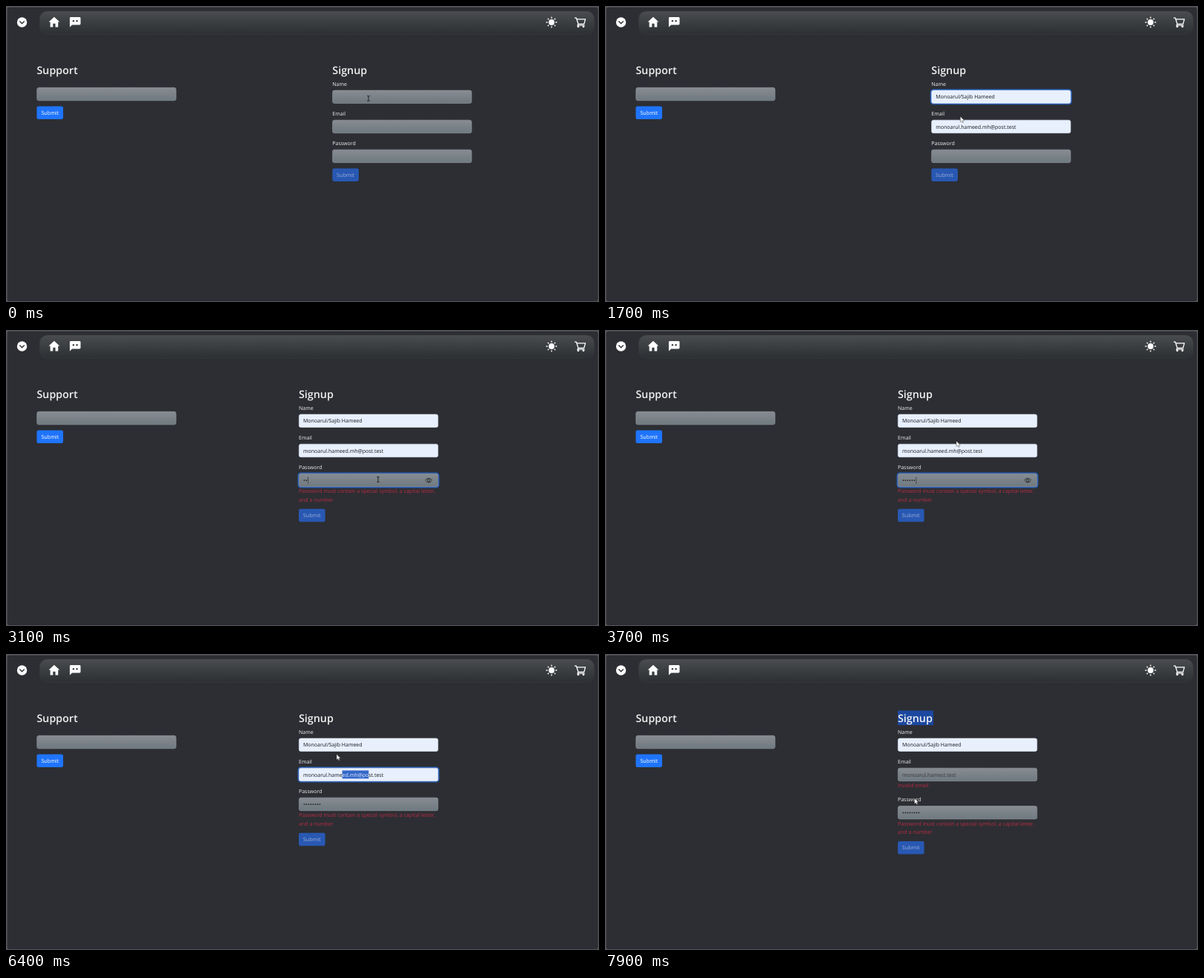
Animation of 800 by 400 pixels, one loop 8000 ms. Source, as an HTML page:

```html
<!DOCTYPE html>
<html lang="en">
<head>
<meta charset="utf-8">
<title>Signup form</title>
<style>
  html, body { margin: 0; width: 100%; height: 100%; overflow: hidden; background: #55565b; }
  svg { display: block; width: 800px; height: 400px; }
  text {
    font: 7px "Open Sans", "Noto Sans", sans-serif;
    fill: #f1f1f2;
    text-rendering: geometricPrecision;
    white-space: pre;
  }
  .head { font-size: 14.3px; font-weight: 600; }
  .error { font-size: 7.05px; fill: #b92c44; }
  .btn { font-size: 7.2px; fill: #fff; }
  .off .btn { fill: #98add8; }
  .box { fill: url(#field); stroke: #949ba1; stroke-width: .6; }
  .filled .box { fill: #e8f0fe; stroke: #dfe8f8; }
  .value { fill: #34393e; }
  .filled .value { fill: #15171a; }
  .ring { fill: none; stroke: #245cb8; stroke-width: 2; }
</style>
</head>
<body>
<svg id="stage" viewBox="0 0 800 400">
  <defs>
    <linearGradient id="field" x2="0" y2="1">
      <stop stop-color="#878c92"/><stop offset="1" stop-color="#6f7980"/>
    </linearGradient>
    <linearGradient id="bar" x2="0" y2="1">
      <stop stop-color="#4a4c4f"/><stop offset="1" stop-color="#2c3033"/>
    </linearGradient>
  </defs>
  <rect width="800" height="400" fill="#55565b"/>
  <rect x="1.7" y="1.7" width="797" height="397.3" rx="3" fill="#2d2e33"/>
  <rect x="45.5" y="7" width="748" height="31" rx="10" fill="url(#bar)" stroke="#3a3c40" stroke-width=".5"/>

  <circle cx="21.6" cy="22" r="6.7" fill="#fff"/>
  <path d="M18.4 20.6l3.2 3.2 3.2-3.2" fill="none" stroke="#2d2e33" stroke-width="1.4"/>
  <path d="M65 14.8l7.3 6.8h-2v6.8h-3.7v-4.6h-3.2v4.6h-3.7v-6.8h-2z" fill="#fff"/>
  <path d="M87.4 15h11.8q1.4 0 1.4 1.4v7.6q0 1.4-1.4 1.4h-9.9l-3.3 3.2v-12.2q0-1.4 1.4-1.4z" fill="#fff"/>
  <g fill="#3a3c40"><circle cx="91" cy="20.2" r="1.2"/><circle cx="95.7" cy="20.2" r="1.2"/></g>
  <g id="sun" fill="#fff"><circle cx="736" cy="22" r="3.9"/></g>
  <g fill="none" stroke="#fff" stroke-width="1.3" stroke-linejoin="round">
    <path d="M767 16.2h2.5l2.5 8.2h7.8l1.8-6.5h-11.3M772 24.4l-1 1.8h9.6"/>
    <circle cx="772" cy="27.7" r=".8"/><circle cx="779" cy="27.7" r=".8"/>
  </g>

  <text class="head" x="41.5" y="92">Support</text>
  <rect class="box" x="41.8" y="110.3" width="187.5" height="17.5" rx="2.5"/>
  <rect x="41.5" y="135.5" width="35.6" height="17.6" rx="2.3" fill="#1f74fb"/>
  <text class="btn" x="47.4" y="147">Submit</text>

  <g id="form">
    <rect id="headSel" x="0" y="76.5" width="48" height="19.6" fill="#1c48a0"/>
    <text class="head" x="0" y="92">Signup</text>
    <g id="name"></g>
    <g id="email"></g>
    <text id="emailError" class="error" x="0" y="180.4">Invalid email</text>
    <g id="password"></g>
    <g id="passError">
      <text class="error" x="0" y="220.3">Password must contain a special symbol, a capital letter,</text>
      <text class="error" x="0" y="231.6">and a number</text>
    </g>
    <g id="submit" class="off">
      <rect x="0" y="219.4" width="35.6" height="17.5" rx="2.3" fill="#2858b2"/>
      <text class="btn" x="5.8" y="230.8">Submit</text>
    </g>
  </g>

  <path id="arrow" d="M0 0v7.4l1.8-1.5 1.2 2.6 1.3-.6-1.2-2.5h2.3z" fill="#fff" stroke="#222" stroke-width=".4"/>
  <path id="beam" d="M-1.8-3.6q1.8 0 1.8 1v5.2q0 1-1.8 1M1.8-3.6q-1.8 0-1.8 1M0 2.6q0 1 1.8 1" fill="none" stroke="#17181a" stroke-width=".9"/>
</svg>
<script>
const LOOP = 8000, STEP = 100;
const NAME = "Monoarul/Sajib Hameed";
const EMAIL = "monoarul.hameed.mh@post.test";
const SEL = [13, 21];

const FILL = 1700, CUT = 6600, HEAD_SELECT = 7600;
const KEYS = [2900, 3000, 3200, 3300, 3500, 3600, 4100, 4300];
const FOCUS = { name: [300, 2500], password: [2500, 5800], email: [5800, 7500] };

// time, x, y
const PATH = [
  [0, 489, 125], [400, 489, 125], [800, 482, 140], [1000, 482, 140],
  [1300, 478, 152], [1600, 478, 150], [1900, 482, 148], [2300, 502, 202],
  [3400, 502, 202], [3700, 474, 150], [4000, 446, 135.5], [5500, 446, 135.5],
  [5800, 453, 163], [6100, 490, 163], [6300, 446, 135.5], [7200, 446, 135.5],
  [7500, 440, 88], [7700, 398, 88], [7900, 417.5, 195]
];

const $ = id => document.getElementById(id);
const show = (el, on) => el.setAttribute("visibility", on ? "visible" : "hidden");
const move = (el, x, y) => el.setAttribute("transform", `translate(${x} ${y})`);

function add(parent, tag, attrs, text) {
  const el = document.createElementNS("http://www.w3.org/2000/svg", tag);
  for (const key in attrs) el.setAttribute(key, attrs[key]);
  if (text) el.textContent = text;
  return parent.appendChild(el);
}

function makeField(id, label, y) {
  const group = $(id), rect = { height: 17.5, width: 187.5, x: .3, y };
  add(group, "text", { x: 0, y: y - 6.3 }, label);
  const ring = add(group, "rect", { ...rect, x: -.5, y: y - .8, width: 189.1, height: 19.1, rx: 3.2, class: "ring" });
  add(group, "rect", { ...rect, rx: 2.5, class: "box" });
  const mark = add(group, "rect", { y: y + 3.2, height: 11, width: 0, fill: "#3467c8" });
  const value = add(group, "text", { x: 6, y: y + 11.4, class: "value" });
  const caret = add(group, "rect", { x: 6, y: y + 4, width: .6, height: 9.6, fill: "#25282b" });
  return { id, group, ring, mark, value, caret, y };
}

const name = makeField("name", "Name", 114);
const email = makeField("email", "Email", 154.2);
const password = makeField("password", "Password", 194.2);
const fields = [name, email, password];

const dots = KEYS.map((_, i) =>
  add(password.group, "circle", { cx: 7.4 + 3 * i, cy: 203.2, r: .9, fill: "#25292d" }));
const eye = add(password.group, "g", { fill: "none", stroke: "#202326", "stroke-width": .9 });
add(eye, "path", { d: "M170.5 203.3q4.8-6 9.6 0M171.6 204.2q3.7 3.6 7.4 0" });
add(eye, "circle", { cx: 175.3, cy: 203.5, r: 1.7 });

for (let i = 0; i < 8; i++)
  add($("sun"), "rect", { x: 735.3, y: 14.6, width: 1.4, height: 2.2, rx: .5, transform: `rotate(${45 * i} 736 22)` });

function cursorAt(t) {
  let i = PATH.findIndex(p => p[0] > t);
  if (i < 0) return PATH[PATH.length - 1].slice(1);
  const [t0, x0, y0] = PATH[i - 1], [t1, x1, y1] = PATH[i];
  const k = (t - t0) / (t1 - t0);
  return [x0 + (x1 - x0) * k, y0 + (y1 - y0) * k];
}

function setText(el, text) {
  if (el.textContent !== text) el.textContent = text;
}

function drawSelection(t) {
  const drag = Math.min(1, Math.max(0, (t - 5800) / 300));
  const count = t < CUT ? Math.round(drag * (SEL[1] - SEL[0])) : 0;
  show(email.mark, count > 0);
  const [a, b] = [SEL[0], SEL[0] + count];
  const parts = [EMAIL.slice(0, a), EMAIL.slice(a, b), EMAIL.slice(b)];
  if (!count) return;
  email.value.textContent = "";
  parts.forEach((part, i) => add(email.value, "tspan", i === 1 ? { fill: "#e9effb" } : {}, part));
  email.mark.setAttribute("x", 6 + email.value.getSubStringLength(0, a));
  email.mark.setAttribute("width", email.value.getSubStringLength(a, count));
}

function render(t) {
  const typed = KEYS.filter(k => k <= t).length;
  const filled = t >= FILL, cut = t >= CUT, failed = typed > 0;
  const left = failed ? 395 : 440.3;
  const drop = cut ? 11.3 : 0;

  move($("form"), left, 0);
  move(password.group, 0, drop);
  move($("passError"), 0, drop);
  move($("submit"), 0, drop + (failed ? 22.3 : 0));
  show($("passError"), failed);
  show($("emailError"), cut);
  show($("headSel"), t >= HEAD_SELECT);

  name.group.setAttribute("class", filled ? "filled" : "");
  email.group.setAttribute("class", filled && !cut ? "filled" : "");
  setText(name.value, filled ? NAME : "");
  setText(email.value, !filled ? "" : cut ? EMAIL.slice(0, SEL[0]) + EMAIL.slice(SEL[1]) : EMAIL);
  drawSelection(t);

  for (const f of fields) {
    const [from, to] = FOCUS[f.id];
    const glow = Math.min((t - from) / 200, 1 - (t - to) / 200, 1);
    f.ring.setAttribute("opacity", Math.max(0, glow));
    show(f.caret, false);
  }

  dots.forEach((dot, i) => show(dot, i < typed));
  const active = t >= FOCUS.password[0] && t < FOCUS.password[1];
  show(eye, active && failed);
  const since = t - (typed ? KEYS[typed - 1] : FOCUS.password[0]);
  show(password.caret, active && Math.floor(since / 500) % 2 === 0);
  password.caret.setAttribute("x", 6 + 3.1 * typed);

  const [x, y] = cursorAt(t);
  const overField = fields.some(f => {
    const top = f.y + (f === password ? drop : 0);
    return y > top && y < top + 17.5;
  });
  const text = overField || (y > 77 && y < 96);
  show($("beam"), text);
  show($("arrow"), !text);
  move($("beam"), x, y);
  move($("arrow"), x, y);
}

const start = performance.now();
function tick() {
  const t = (performance.now() - start) % LOOP;
  render(Math.floor(t / STEP) * STEP);
  requestAnimationFrame(tick);
}
tick();
</script>
</body>
</html>
```
